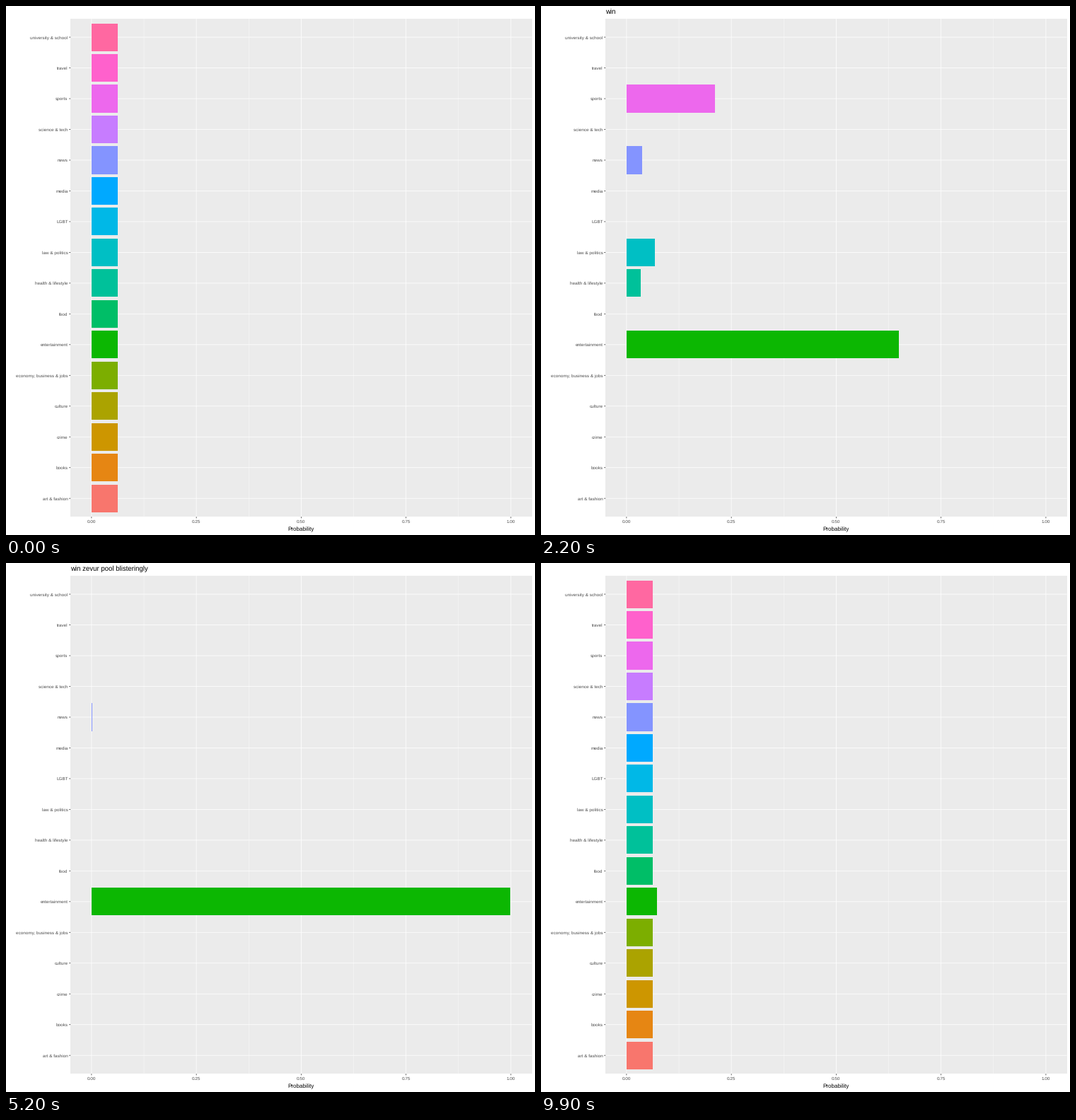
A matplotlib script that plays this animation: 748 px wide and 748 px high, repeating every 10 s.

```python
import matplotlib.pyplot as plt
from matplotlib.animation import FuncAnimation
from matplotlib.patches import Rectangle

SIZE, DPI = 748, 64
PX = 72 / DPI                      # points per pixel
FRAMES, INTERVAL = 100, 100

plt.rcParams["font.family"] = "Liberation Sans"
plt.rcParams["text.hinting"] = "none"

TOPICS = [
    ("art & fashion", "#F8766D"), ("books", "#E68613"),
    ("crime", "#CD9600"), ("culture", "#ABA300"),
    ("economy, business & jobs", "#7CAE00"), ("entertainment", "#0CB702"),
    ("food", "#00BE67"), ("health & lifestyle", "#00C19A"),
    ("law & politics", "#00BFC4"), ("LGBT", "#00B8E7"),
    ("media", "#00A9FF"), ("news", "#8494FF"),
    ("science & tech", "#C77CFF"), ("sports", "#ED68ED"),
    ("travel", "#FF61CC"), ("university & school", "#FF68A1"),
]
NAMES = [name for name, _ in TOPICS]
WORDS = "win zevur pool blisteringly accurate prediction".split()

# Probabilities after each word; topics left out are zero.
STATES = [
    {name: 1 / 16 for name in NAMES},
    {"sports": 0.4842, "entertainment": 0.2125, "law & politics": 0.154,
     "health & lifestyle": 0.0785, "news": 0.0708},
    {"entertainment": 0.9877, "news": 0.0123},
    {"entertainment": 0.9978, "news": 0.0018},
    {"entertainment": 0.9978, "news": 0.00128},
    {"entertainment": 1.0},
    {"entertainment": 1.0},
]
STATES.append(STATES[0])
STEPS = len(STATES) - 1
KEYS = [round(FRAMES * k / STEPS) for k in range(STEPS + 1)]

# Panel geometry in pixels
ZERO, UNIT = 120.9, 593.0
FIRST_ROW, ROW = 44.07, 43.475
LEFT, RIGHT = ZERO - 0.05 * UNIT, ZERO + 1.05 * UNIT
TOP, BOTTOM = FIRST_ROW - 0.6 * ROW, FIRST_ROW + 15.6 * ROW
LINE = 0.776


def x_of(value):
    return ZERO + UNIT * value


def y_of(index):
    return FIRST_ROW + ROW * (len(TOPICS) - 1 - index)


def ease(t):
    return 2 * t * t if t < 0.5 else 1 - 2 * (1 - t) ** 2


fig = plt.figure(figsize=(SIZE / DPI, SIZE / DPI), dpi=DPI, facecolor="white")
ax = fig.add_axes([0, 0, 1, 1])
ax.set_xlim(0, SIZE)
ax.set_ylim(SIZE, 0)
ax.axis("off")


def line(xs, ys, color="white", width=LINE):
    ax.plot(xs, ys, color=color, lw=width * PX, snap=False,
            solid_capstyle="butt", zorder=1)


def rect(x, y, w, h, color, z):
    return ax.add_patch(Rectangle((x, y), w, h, facecolor=color,
                                  edgecolor="none", lw=0, snap=True, zorder=z))


def label(x, y, text, size, color="black", ha="left"):
    return ax.text(x, y, text, fontsize=size * PX, color=color,
                   ha=ha, va="baseline", zorder=3)


rect(LEFT, TOP, RIGHT - LEFT, BOTTOM - TOP, "#EBEBEB", 0)
for k in range(4):
    x = x_of(0.125 + k / 4)
    line([x, x], [TOP, BOTTOM], width=LINE / 2)
for i, name in enumerate(NAMES):
    y = y_of(i)
    line([LEFT, RIGHT], [y, y])
    line([LEFT - 2, LEFT], [y, y], "#333333")
    label(LEFT - 3.6, y + 2.3, name, 6.4, "#4D4D4D", "right")
for k in range(5):
    x = x_of(k / 4)
    line([x, x], [TOP, BOTTOM])
    line([x, x], [BOTTOM, BOTTOM + 2], "#333333")
    label(x, 731, f"{k / 4:.2f}", 6.4, "#4D4D4D", "center")
label((LEFT + RIGHT) / 2, 742, "Probability", 8, ha="center")

title = label(LEFT, 11, "", 9.6)
bars = [rect(ZERO, y_of(i) - 0.45 * ROW, 0, 0.9 * ROW, color, 2)
        for i, (_, color) in enumerate(TOPICS)]


def update(frame):
    step = max(k for k in range(STEPS) if KEYS[k] <= frame)
    t = ease((frame - KEYS[step]) / (KEYS[step + 1] - KEYS[step]))
    before, after = STATES[step], STATES[step + 1]
    for name, bar in zip(NAMES, bars):
        a, b = before.get(name, 0), after.get(name, 0)
        bar.set_width(UNIT * (a + (b - a) * t))
    # A word joins the title every 14 frames, then all are cleared.
    count = (frame + 4) // 14
    title.set_text(" ".join(WORDS[:count]) if count <= len(WORDS) else "")
    return [*bars, title]


anim = FuncAnimation(fig, update, frames=FRAMES, interval=INTERVAL,
                     repeat=True, repeat_delay=0, blit=False)
plt.show()
```
